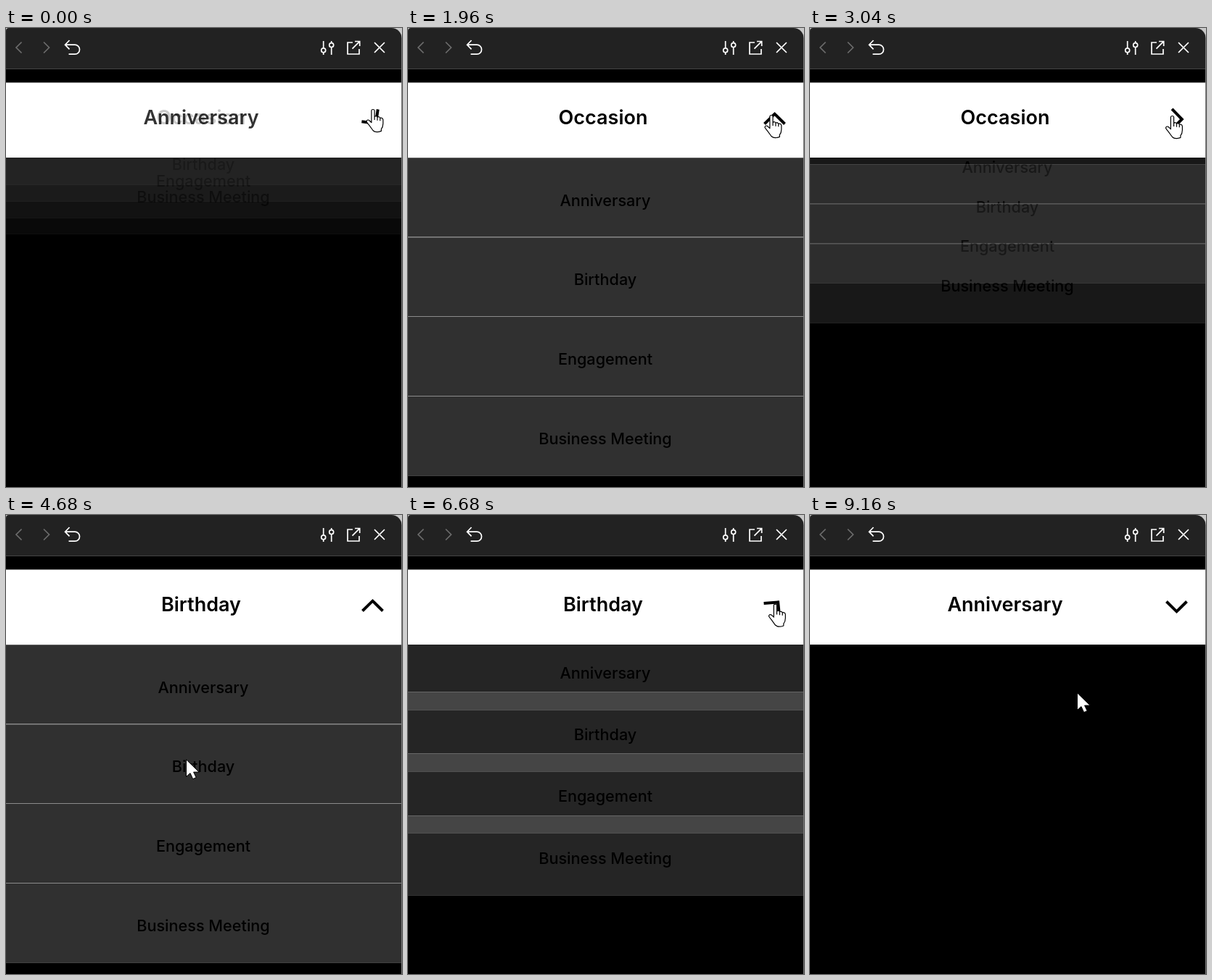
An HTML page that plays this animation: 546x634 px, repeating every 9.2 s.

```html
<!DOCTYPE html>
<html lang="en">
<head>
<meta charset="utf-8">
<title>Occasion dropdown</title>
<style>
  html, body { margin: 0; width: 100%; height: 100%; overflow: hidden; background: #000; }
  svg { display: block; width: 100vw; height: 100vh; }
  text { font-family: Inter, sans-serif; text-anchor: middle; }
  .title { font-size: 27px; font-weight: 600; }
  .row { font-size: 21.65px; font-weight: 500; }
  .icon { fill: none; stroke: #fff; stroke-width: 1.7; }
</style>
</head>
<body>
<svg viewBox="0 0 546 634">
  <rect width="546" height="634" fill="#000"/>
  <g id="rows"></g>

  <rect y="57" width="546" height="19" fill="#000"/>
  <rect y="75" width="545" height="1" fill="#999"/>
  <rect y="76" width="545" height="103" fill="#fff"/>
  <g id="titles"></g>
  <path id="chevron" d="M-14-6.5 0 7.3 14-6.5" fill="none" stroke="#000" stroke-width="4"/>

  <rect width="546" height="16" fill="#c8c8c8"/>
  <path d="M0 57V4Q0 0 4 0H531.5A14 14 0 0 1 545.5 14V57Z" fill="#222"/>
  <path d="M0 56.5H546" stroke="#444"/>
  <path d="M545.5 15V634" stroke="#777"/>
  <g class="icon">
    <path d="M21.5 19.5 14 27l7.5 7.5M52 19.5 59.5 27 52 34.5" stroke="#6c6c6c"/>
    <path d="M87.5 17 81.5 23.2l6 6.2M82 23.2H95a6.5 6.5 0 0 1 0 13H86.5"/>
    <path d="M437.7 18v9.8M437.7 33.8V37M448.7 18v2.6M448.7 26.6V37"/>
    <circle cx="437.7" cy="30.8" r="3"/>
    <circle cx="448.7" cy="23.6" r="3"/>
    <path d="M478 20H471V36H487V29M481 18.5H487.7V25M487.5 18.7 477.5 28.7"/>
    <path d="M508 20 522 34M522 20 508 34"/>
  </g>

  <path id="hand" fill="#fff" stroke="#000" stroke-width="1.2" stroke-linejoin="round"
    d="M-2.1 1Q-2-.5 0-.5T2.1 1V9.5Q4.8 7.6 6 10.2 8.8 8.8 9.8 11.4 13.3 10.4 13.9 13.8V19Q13.8 23.8 11.4 26.6V29.4Q3.8 32.3 0 28.5-2.8 24.7-5.2 21.4-8 18-9 16.2-8.5 13.3-5.7 14.2L-2.1 17.6ZM2.1 9.5V14M6 10.5V14.7M9.8 11.4V15.2"/>
  <path id="arrow" fill="#fff" stroke="#000" stroke-width="1"
    d="M-.5-1.2V22.5L5 17.6 8.7 25.6 13.2 23.6 9.6 16.1H17.2Z"/>
</svg>
<script>
const LOOP = 9200, OPEN_MS = 300, PICK_MS = 110;
const ROW_H = 110, PITCH = 109.65, FOLDED = 197.7, FIRST = 288.8;
const NAMES = ["Anniversary", "Birthday", "Engagement", "Business Meeting"];
const PICK_BIRTHDAY = 4684, PICK_ANNIVERSARY = 8450;

// start, opening (1) or closing (0), duration
const TOGGLES = [
  [-37, 1, OPEN_MS], [2010, 0, OPEN_MS], [2941, 1, OPEN_MS], [PICK_BIRTHDAY, 0, PICK_MS],
  [5768, 1, OPEN_MS], [6640, 0, OPEN_MS], [7150, 1, OPEN_MS], [PICK_ANNIVERSARY, 0, PICK_MS]
];

// time, x, y of the pointer tip
const TRACK = [
  [0, 506, 113], [400, 504, 117], [1000, 504, 118], [1250, 310, 240], [1500, 224, 540],
  [1640, 290, 420], [1900, 501, 121], [3040, 499.5, 122], [3400, 500, 122], [3900, 330, 270],
  [4450, 249, 339], [5000, 249, 339], [5650, 505, 123], [5920, 507, 123], [7350, 506, 124],
  [7640, 465, 166], [8250, 369, 247], [LOOP, 369, 247]
];

const $ = id => document.getElementById(id);
function add(parent, tag, attrs, text) {
  const el = document.createElementNS(parent.namespaceURI, tag);
  for (const k in attrs) el.setAttribute(k, attrs[k]);
  if (text) el.textContent = text;
  parent.appendChild(el);
  return el;
}

const rows = NAMES.map(name => {
  const g = add($("rows"), "g", {});
  add(g, "rect", { y: -ROW_H, width: 545, height: ROW_H, fill: "#fff", "fill-opacity": .19 });
  add(g, "path", { d: `M0 ${.5 - ROW_H}H545M0 .5H545`, stroke: "#fff", "stroke-opacity": .25 });
  add(g, "text", { x: 272, y: -43.2, class: "row" }, name);
  return g;
});
const titles = ["Anniversary", "Occasion", "Birthday"].map(name =>
  add($("titles"), "text", { x: 269, y: 133.3, class: "title" }, name));

const clamp = x => Math.max(0, Math.min(1, x));
const easeOut = x => 1 - Math.pow(1 - clamp(x), 1.7);

function openness(t) {
  const [start, to, ms] = TOGGLES.filter(s => s[0] <= t).pop();
  const e = easeOut((t - start) / ms);
  return to ? e : 1 - e;
}

function pointer(t) {
  const i = Math.max(1, TRACK.findIndex(k => k[0] > t));
  const [t0, x0, y0] = TRACK[i - 1], [t1, x1, y1] = TRACK[i];
  const u = (t - t0) / (t1 - t0), e = u * u * (3 - 2 * u);
  return [x0 + (x1 - x0) * e, y0 + (y1 - y0) * e];
}

function titleMix(t, p) {
  if (t < 1000) return [1 - p, p, 0];
  if (t < PICK_BIRTHDAY - 30) return [0, 1, 0];
  return t < PICK_ANNIVERSARY - 30 ? [0, 0, 1] : [1, 0, 0];
}

function draw(t) {
  const p = openness(t);
  rows.forEach((g, i) => {
    const y = FOLDED + (FIRST + PITCH * i - FOLDED) * p;
    g.setAttribute("transform", `translate(0 ${Math.round(y)})`);
    g.setAttribute("opacity", p);
  });
  titleMix(t, p).forEach((o, i) => titles[i].setAttribute("opacity", o));
  $("chevron").setAttribute("transform", `translate(505.5 126) rotate(${-180 * p})`);

  const [x, y] = pointer(t);
  const picked = (t > PICK_BIRTHDAY - 30 && t < 5768) || t > PICK_ANNIVERSARY - 30;
  const onLink = (y > 76 && y < 179) || (!picked && p > 0);
  for (const id of ["hand", "arrow"]) {
    $(id).setAttribute("transform", `translate(${x} ${y})`);
    $(id).setAttribute("visibility", (id === "hand") === onLink ? "visible" : "hidden");
  }
}

const began = performance.now();
function tick() {
  draw((performance.now() - began) % LOOP);
  requestAnimationFrame(tick);
}
tick();
</script>
</body>
</html>
```
